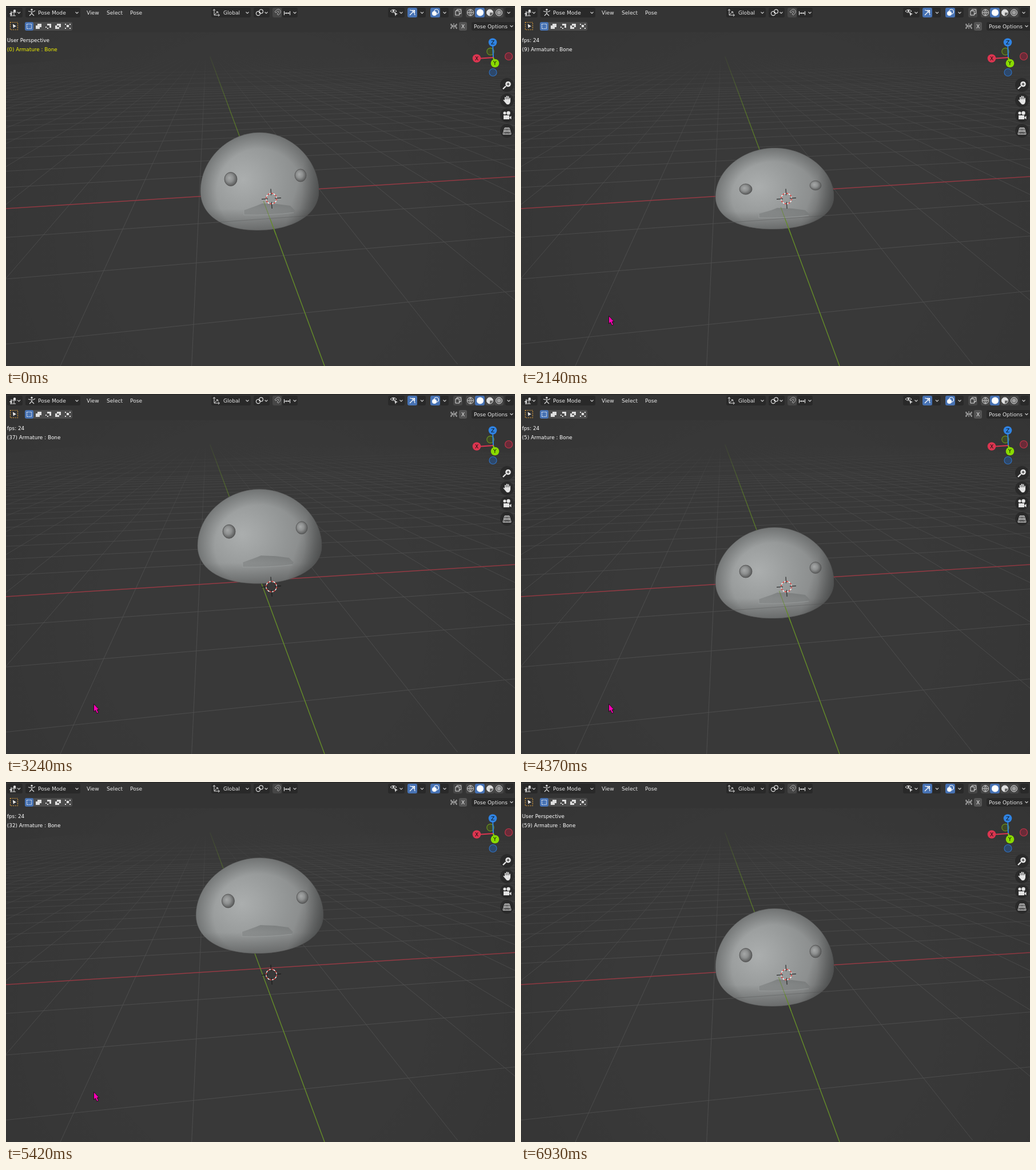
An HTML page with a canvas that plays this animation: 890x629 px, repeating every 7.58 s.

```html
<!DOCTYPE html>
<html lang="en">
<head>
<meta charset="utf-8">
<title>Jumping blob</title>
<style>
html, body { margin: 0; width: 100%; height: 100%; overflow: hidden; background: #393939; }
canvas { display: block; }
</style>
</head>
<body>
<canvas id="stage" width="890" height="629"></canvas>
<script>
const W = 890, H = 629, LOOP = 7580, PLAY = 1810, STOP = 6430;
const stage = document.getElementById('stage');
const back = document.createElement('canvas');
back.width = W;
back.height = H;
let c = back.getContext('2d');

const BLUE = '#4772b3', LIGHT = '#dedede';

function fill(path, color) {
  c.fillStyle = color;
  c.fill(new Path2D(path));
}
function stroke(path, color = LIGHT, width = 1) {
  c.strokeStyle = color;
  c.lineWidth = width;
  c.stroke(new Path2D(path));
}
function disc(x, y, r, color, edge, width = 1) {
  c.beginPath();
  c.arc(x, y, r, 0, 7);
  if (color) { c.fillStyle = color; c.fill(); }
  if (edge) { c.strokeStyle = edge; c.lineWidth = width; c.stroke(); }
}
function box(x, y, w, h, color, r = 3) {
  c.beginPath();
  c.roundRect(x, y, w, h, r);
  c.fillStyle = color;
  c.fill();
}
function text(s, x, y, color = '#e8e8e8', size = 9.1) {
  c.font = size + 'px "DejaVu Sans", sans-serif';
  c.fillStyle = color;
  c.fillText(s, x, y);
}
function stops(gradient, ...list) {
  for (const [at, color] of list) gradient.addColorStop(at, color);
  return gradient;
}
const chevron = (x, y) => stroke(`M${x - 2.5} ${y - 1}l2.5 2.5l2.5 -2.5`, '#d0d0d0', 1.1);

// Ground grid: two families of lines, each meeting at a far point; the horizon tilts a little
const VX = 5697, VX_Y = -4, VY = 350, VY_Y = 70;
const rowY = j => 74.9 + 1 / (0.003583 + 0.000548 * j);
const onRow = (j, x) => rowY(j) + (VX_Y - rowY(j)) * x / VX;
const axisX = y => VY + (y - VY_Y) * 207 / 559;

function drawGrid() {
  const fade = stops(c.createLinearGradient(0, 88, 0, 330),
    [0, 'rgba(80,80,80,0)'], [0.25, 'rgba(80,80,80,.4)'], [1, 'rgba(80,80,80,.85)']);
  for (let i = -30; i <= 30; i++) {
    if (i) stroke(`M${VY} ${VY_Y}L${557 + 232.5 * i} ${629 - 3.2 * i}`, fade);
  }
  for (let j = -4; j <= 34; j++) {
    if (j && (j < 18 || j % 4 === 0)) stroke(`M0 ${rowY(j)}L${W} ${onRow(j, W)}`, fade);
  }
  stroke('M0 354L890 298', '#963a44', 1.3);
  const green = stops(c.createLinearGradient(0, 88, 0, 330),
    [0, 'rgba(98,138,36,.1)'], [0.4, 'rgba(98,138,36,.65)'], [1, '#648c28']);
  stroke(`M${axisX(88)} 88L557 629`, green, 1.4);
}

function drawVignette() {
  c.fillStyle = stops(c.createRadialGradient(445, 400, 260, 445, 400, 600),
    [0, 'rgba(0,0,0,0)'], [1, 'rgba(0,0,0,.09)']);
  c.fillRect(0, 0, W, H);
}

function drawHeader() {
  box(0, 0, W, 46, '#343434', 0);
  box(0, 0, W, 1, '#202020', 0);

  for (const [x, w] of [[2, 27], [34, 96], [359, 69], [433, 28], [483, 27], [668, 29], [719, 15], [759, 15], [873, 15]])
    box(x, 3, w, 17, '#292929');
  for (const x of [466, 782, 804, 838, 854]) box(x, 3, 16, 17, '#464646');
  for (const x of [702, 742, 820]) box(x, 3, 17, 17, BLUE);
  for (const x of [22.5, 124, 422, 455, 505, 691, 727.5, 767, 879]) chevron(x, 11.5);

  text('Pose Mode', 56, 15);
  text('View', 141, 15);
  text('Select', 176, 15);
  text('Pose', 217, 15);
  text('Global', 380, 15);

  // Editor type and mode
  stroke('M6 14l4 -3l8 0M7 17l10 0M9 9v9M14 9v8');
  disc(15, 8.5, 2.2, LIGHT);
  disc(9, 14, 1.8, LIGHT);
  disc(45, 6.5, 1.7, LIGHT);
  stroke('M39 9l4 1h5l3 -2M45 10v3l-4 4M45 13l4 4', LIGHT, 1.2);
  // Orientation, pivot, snapping
  stroke('M364 6v10h9M364 16l6 -6M362 8l2 -2.5l2 2.5M371 14l2.5 2l-2.5 2M367.5 10h3v3');
  disc(441, 13, 3.6, null, LIGHT, 1.2);
  disc(446, 9.5, 3.4, null, LIGHT, 1.2);
  disc(443.5, 11.5, 1.3, LIGHT);
  stroke('M470 10l3 -3a4 4 0 0 1 6 6l-3 3l-2 -2l3 -3a1.5 1.5 0 0 0 -2 -2l-3 3z', '#aaaaaa');
  stroke('M486 12.5h11M486.5 9v7M490 11v3M493.5 11v3M496.5 9v7', LIGHT, 1.2);
  // Visibility, gizmos, overlays
  stroke('M672 9q5.5 -5.5 11 0q-5.5 5 -11 0z');
  disc(677.5, 8.7, 1.7, LIGHT);
  fill('M679 11l6 3l-3 1l-1 3z', LIGHT);
  stroke('M706 7q8 1 9 9M706 16l8 -8M710 7.5h4.5v4.5', '#ffffff', 1.2);
  disc(749, 13, 4, '#ffffff');
  disc(752.5, 10, 4, null, '#ffffff', 1.2);
  // X-ray and shading modes
  stroke('M786 8.5h6.5v7.5h-6.5zM788.5 8.5v-2.5h7v7.5h-3');
  disc(812, 11.5, 5.5, null, LIGHT);
  stroke('M807 11.5h10M812 6.5v10M812 6.5q-5 5 0 10M812 6.5q5 5 0 10', LIGHT, 0.7);
  disc(829, 11.5, 6, '#ffffff');
  disc(846, 11.5, 5.5, '#666666', LIGHT);
  fill('M846 6a5.5 5.5 0 0 0 0 11v-5.5h5.5a5.5 5.5 0 0 0 -5.500 -5.500z', LIGHT);
  disc(862, 11.5, 5.5, '#666666', LIGHT);
  disc(862, 11.5, 3.3, '#a0a0a0');

  // Tool row
  c.setLineDash([2, 1.6]);
  c.strokeStyle = '#d79a3c';
  c.lineWidth = 1.2;
  c.strokeRect(7.5, 28.5, 13, 13);
  c.setLineDash([]);
  fill('M12 31.5l6 4l-3 .7l-2 2.5z', '#ffffff');
  box(33, 28, 83, 15, '#4c4c4c');
  box(33, 28, 15, 15, BLUE);
  c.setLineDash([1.5, 1.2]);
  c.strokeStyle = '#ffffff';
  c.strokeRect(36.5, 31.5, 8, 8);
  c.setLineDash([]);
  fill('M55 31h7v6h-3v3h-7v-6h3z', LIGHT);
  fill('M72 31h7v7h-3v-4h-4zM69 36h2v2h-2zM72 38h2v2h-2z', LIGHT);
  fill('M89 31h7v6h-3v3h-7v-6h3z', LIGHT);
  c.fillStyle = '#4c4c4c';
  c.fillRect(89.3, 34.3, 3.4, 2.5);
  fill('M106 33h4v4h-4zM103 31h2v2h-2zM111 31h2v2h-2zM103 38h2v2h-2zM111 38h2v2h-2z', LIGHT);
  stroke('M782 35l-4 -4v3l3 1l-3 2v3zM784 35l4 -4v3l-3 1l3 2v3zM783 30v10', '#b8b8b8');
  box(792, 28, 14, 15, '#545454');
  text('X', 796, 38.5);
  box(814, 28, 80, 15, '#292929');
  text('Pose Options', 818, 38.5);
  chevron(884, 35);
}

function drawGizmo() {
  disc(847, 79.5, 6.2, '#3f4a25', '#6b9420', 1.2);
  disc(879, 88, 6.5, '#6a2b38', '#c13549', 1.2);
  disc(851.5, 116, 6.5, '#2d486b', '#3070bf', 1.2);
  stroke('M852 90L851 64', '#2f83e3', 2);
  stroke('M852 90L823 92', '#dc3550', 2);
  stroke('M852 90L855 100', '#8adb00', 2);
  for (const [name, x, y, color] of [['Z', 851, 63.5, '#2f83e3'], ['X', 823, 91.5, '#dc3550'], ['Y', 855, 100, '#8adb00']]) {
    disc(x, y, 7.3, color);
    text(name, x - 3.1, y + 3.4, '#101010');
  }

  for (const y of [138, 165, 191, 218]) disc(876, y, 12, '#2a2a2a');
  stroke('M874 140l-5 5', '#e4e4e4', 2.4);
  disc(878, 136.5, 4.8, '#e4e4e4');
  stroke('M875.5 136.5h5M878 134v5', '#2a2a2a', 1.2);
  stroke('M873 164v-5M875.7 163v-6M878.4 163v-5.5M881 165v-4.5M870 164l3.5 4', '#e4e4e4', 1.8);
  fill('M872 163h10v4q-1 5 -4 5h-2q-2 -1 -4 -5z', '#e4e4e4');
  disc(872, 187, 2.6, '#e4e4e4');
  disc(878.5, 187, 3.2, '#e4e4e4');
  fill('M870 191h10v7h-10zM880.5 194l3 -2v6l-3 -2z', '#e4e4e4');
  stroke('M872 213h8l3 11h-14zM870.5 218.5h11M876 213v11M874 213l-2 11M878 213l2 11', '#e4e4e4');
}

c.fillStyle = '#393939';
c.fillRect(0, 0, W, H);
drawGrid();
drawVignette();
drawHeader();
drawGizmo();
c = stage.getContext('2d');

// frame, top, bottom, eye height on screen, eye size, mouth line (all without the jump)
const KEYS = [
  [0, 221, 392, 302.5, 24, 365],
  [5, 233, 392, 310, 22, 366],
  [9, 248, 390, 320, 18.5, 370],
  [12, 254, 388, 324, 17, 371],
  [19, 232, 392, 307, 22, 364],
  [22, 234, 392.5, 306.5, 22, 364],
  [30, 224, 392, 300, 24, 362],
  [37, 226, 391, 300, 24, 362],
  [41, 233, 391, 307, 22, 365],
  [43, 254, 384, 322, 16, 366],
  [46, 260, 382, 326, 15, 366],
  [58, 221, 392, 302.5, 24, 365],
  [61, 221, 392, 302.5, 24, 365]
];
function pose(f) {
  const n = KEYS.findIndex(k => k[0] > f);
  const a = KEYS[n - 1], b = KEYS[n], s = (f - a[0]) / (b[0] - a[0]);
  const lift = Math.max(0, 95 - 0.72 * (f - 30) ** 2);
  const [top, bot, eyeY, eye, mouth] = a.slice(1).map((v, i) => v + (b[i + 1] - v) * s);
  return { top: top - lift, bot: bot - lift, eyeY: eyeY - lift, eye, mouth: mouth - lift, lift };
}

function drawEye(x, y, rx, ry) {
  c.save();
  c.translate(x, y);
  c.scale(rx, ry);
  const shade = stops(c.createRadialGradient(-0.25, -0.2, 0, -0.1, -0.1, 1.12),
    [0, '#a6a8a8'], [0.5, '#8e9090'], [1, '#585959']);
  disc(0, 0, 1, shade, '#505050', 0.07);
  c.restore();
}

// Shading in unit space: a highlight at the lower left, a dark rim, darker right and bottom
function shadeBody(cx, mid, rx, ry) {
  c.translate(cx, mid);
  c.scale(rx, ry);
  const layers = [
    stops(c.createRadialGradient(-0.28, -0.2, 0, -0.28, -0.2, 1.4),
      [0, '#abaeae'], [0.2, '#a2a5a5'], [0.5, '#939696'], [0.8, '#868888'], [1, '#747676']),
    stops(c.createRadialGradient(0, 0, 0.72, 0, 0, 1.03), [0, 'rgba(60,62,62,0)'], [1, 'rgba(60,62,62,.4)']),
    stops(c.createLinearGradient(0.6, 0, 1, 0.12), [0, 'rgba(50,51,51,0)'], [1, 'rgba(50,51,51,.45)']),
    stops(c.createLinearGradient(0, 0.3, 0, 0.68), [0, 'rgba(50,51,51,0)'], [1, 'rgba(50,51,51,.4)'])
  ];
  for (const layer of layers) {
    c.fillStyle = layer;
    c.fillRect(-2, -2, 4, 4);
  }
}

function drawBody({ top, bot, eyeY, eye, mouth, lift }) {
  const left = 340 - 0.085 * lift, right = 547 + 0.085 * lift;
  const cx = (left + right) / 2, rx = cx - left, h = bot - top, mid = top + 0.6 * h;
  const up = mid - 0.54 * (mid - top), low = mid + 0.62 * (bot - mid);
  const shape = `M${left} ${mid}C${left} ${up} ${cx - 0.53 * rx} ${top} ${cx} ${top}` +
    `S${right} ${up} ${right} ${mid}C${right} ${low} ${cx + 0.54 * rx} ${bot} ${cx - 4} ${bot}` +
    `S${left} ${low} ${left} ${mid}z`;

  c.save();
  c.clip(new Path2D(shape));
  shadeBody(cx, mid, rx, mid - top);
  c.restore();
  stroke(shape, 'rgba(75,75,75,.6)', 0.8);

  // Mouth
  const x = 416 - 0.035 * lift, tall = 8 + eye / 2, peak = mouth - tall;
  const side = mouth - 0.4 * tall, lip = `Q${x + 48} ${mouth + 1} ${x + 87} ${mouth - 4}`;
  const shade = stops(c.createLinearGradient(0, peak, 0, mouth),
    [0, 'rgba(95,98,98,.45)'], [1, 'rgba(125,128,128,.4)']);
  fill(`M${x} ${mouth}V${side}L${x + 22} ${peak + 4}L${x + 32} ${peak}L${x + 58} ${peak + 1}` +
    `L${x + 81} ${peak + 4}L${x + 89} ${peak + 12}L${x + 87} ${mouth - 4}Q${x + 48} ${mouth + 1} ${x} ${mouth}z`, shade);
  stroke(`M${x} ${side}V${mouth}${lip}`, 'rgba(160,163,163,.6)');

  drawEye(393 - 0.05 * lift, eyeY, 11, eye / 2);
  drawEye(515 + 0.035 * lift, eyeY - 6.5, 10, eye / 2 - 1);

  // Floor lines seen through the body while it stands
  if (lift < 5) {
    const y = mouth - eye;
    stroke(`M350 ${onRow(-1, 350)}L540 ${onRow(-1, 540)}`, 'rgba(75,75,75,.35)');
    stroke(`M${axisX(y)} ${y}L${axisX(372)} 372`, 'rgba(100,140,40,.6)', 1.2);
    stroke(`M${axisX(372)} 372L${axisX(400)} 400`, '#648c28', 1.4);
  }
}

function draw3dCursor() {
  c.lineWidth = 1.4;
  for (let i = 0; i < 16; i++) {
    c.beginPath();
    c.arc(464, 336.5, 9.2, i * Math.PI / 8, (i + 1) * Math.PI / 8);
    c.strokeStyle = i % 2 ? '#ffffff' : '#e5403c';
    c.stroke();
  }
  stroke('M447 337.5l11 -.6M470 336l11 -.7M463 319.5l.5 11M464.5 342.5l.6 11.5', '#151515');
}

function drawPointer(t) {
  let x = 153.5, y = 541.5;
  if (t < 310 || t >= 6930) return;
  if (t < 500) {
    const s = Math.floor((t - 310) / 38) / 5;
    x -= 144 * (1 - s);
    y += 43 * (1 - s);
  } else if (t >= 6870) {
    x = 342;
    y = 584;
  }
  const arrow = `M${x} ${y}v13.5l3 -2.5l2.5 5.5l2.6 -1.2l-2.4 -5.2h3.6z`;
  fill(arrow, '#ff00b8');
  stroke(arrow, '#1a0814', 0.9);
}

function render(t) {
  const playing = t >= PLAY && t < STOP;
  const f = t < PLAY ? 0 : playing ? Math.floor(0.02587 * (t - 1790)) % 61 : 59;
  c.drawImage(back, 0, 0);
  drawBody(pose(f));
  draw3dCursor();
  text(playing ? 'fps: 24' : 'User Perspective', 1.8, 63.3, '#ffffff', 8.85);
  text(`(${f}) Armature : Bone`, 1.8, 79.3, f ? '#ffffff' : '#f2f200', 8.85);
  drawPointer(t);
}

function tick() {
  render(performance.now() % LOOP);
  requestAnimationFrame(tick);
}
tick();
</script>
</body>
</html>
```
